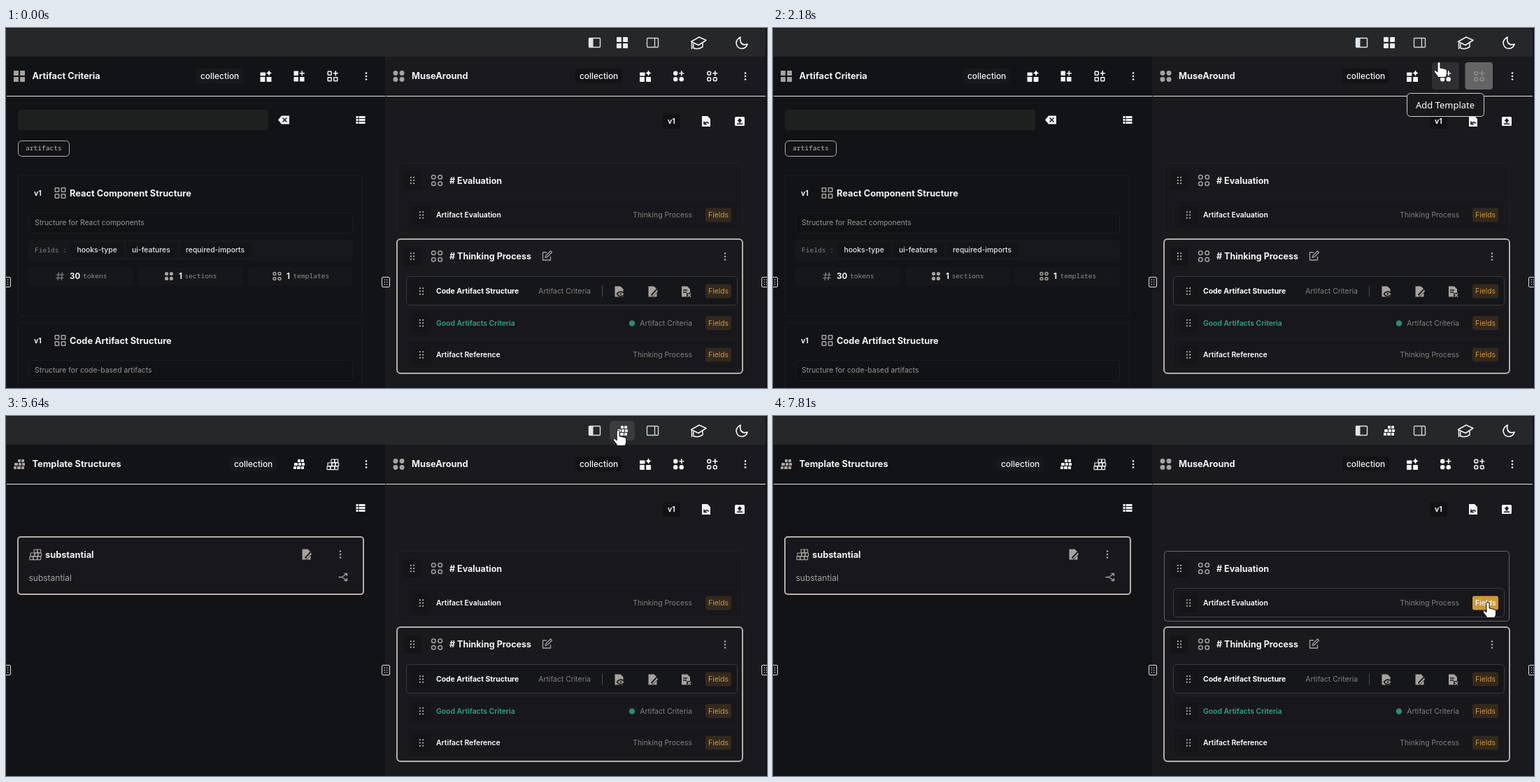
An HTML page that plays this animation: 1088 by 515 pixels, repeating every 8000 ms.

```html
<!DOCTYPE html>
<html lang="en">
<head>
<meta charset="utf-8">
<title>Template panels</title>
<style>
html, body { margin: 0; width: 100%; height: 100%; overflow: hidden; background: #111316; }
svg { display: block; }
text { font-family: Inter, sans-serif; white-space: pre; }
.mono { font-family: "Noto Sans Mono", monospace; }
.tip { font-family: "Noto Sans", sans-serif; }
</style>
</head>
<body>
<svg id="stage" width="1088" height="515" viewBox="0 0 1088 515"></svg>
<script>
const LOOP = 8000, SWITCH = 4150;
const WHITE = '#f4f4f5', STONE = '#a8a29e', GRAY = '#85807c', LEFT = '#111316', RIGHT = '#1a191d';

// Drawing helpers
const rect = (x, y, w, h, fill, r = 0, stroke = 'none', sw = 1) =>
  `<rect x="${x}" y="${y}" width="${w}" height="${h}" rx="${r}" fill="${fill}" stroke="${stroke}" stroke-width="${sw}"/>`;
const circle = (x, y, r, fill, stroke = 'none', sw = 1.5) =>
  `<circle cx="${x}" cy="${y}" r="${r}" fill="${fill}" stroke="${stroke}" stroke-width="${sw}"/>`;
const fillPath = (d, fill) => `<path d="${d}" fill="${fill}"/>`;
const linePath = (d, stroke, sw = 1.5) =>
  `<path d="${d}" fill="none" stroke="${stroke}" stroke-width="${sw}" stroke-linejoin="round"/>`;
const at = (x, y, body) => `<g transform="translate(${x} ${y})">${body}</g>`;
// y is the middle of the capital letters
const text = (x, y, s, size, fill, weight = 400, more = '') =>
  `<text x="${x}" y="${y + size * 0.36}" font-size="${size}" fill="${fill}" font-weight="${weight}" ${more}>${s}</text>`;
const title = (x, y, s, size = 12.8) => text(x, y, s, size, WHITE, 700);
const small = (x, y, s, fill, weight = 400, more = '') => text(x, y, s, 10.4, fill, weight, more);
const mono = (x, y, s, fill) => text(x, y, s, 9.6, fill, 500, 'class="mono"');

// Areas that light up under the pointer
const zones = [];
function hover(x, y, w, h, body, hand = false) {
  zones.push({ x, y, w, h, hand });
  return `<g id="zone${zones.length - 1}" opacity="0">${body}</g>`;
}

// Icons
const STAR = 'M0-4.5Q.8-.8 4.5 0Q.8.8 0 4.5Q-.8.8-4.5 0Q-.8-.8 0-4.5Z';
function grid(x, y, { round, line, extra, c = WHITE, s = 16 } = {}) {
  const a = s * 0.43, o = s / 2 - a / 2, w = 1.5, size = line ? a - w : a;
  const cell = (i, j) => {
    const cx = i * o, cy = j * o, paint = line ? ['none', c] : [c];
    return round ? circle(cx, cy, size / 2, ...paint)
      : rect(cx - size / 2, cy - size / 2, size, size, paint[0], 0.4, paint[1], w);
  };
  let body = cell(-1, 1) + cell(1, 1);
  if (extra === 'star') body += rect(-8, -5.5, 7.5, 5, c, 1) + at(4.5, -4.5, fillPath(STAR, c));
  else {
    body += cell(-1, -1);
    body += extra === 'plus' ? linePath(`M${o} ${-o - 3.5}v7M${o - 3.5} ${-o}h7`, c, 1.7) : cell(1, -1);
  }
  return at(x, y, body);
}
function bricks(x, y, c, line) {
  const rows = [[-2, -7, 4], [3, -7, 4], [-7, -2, 5], [-1, -2, 4], [4, -2, 4], [-8, 3, 4], [-3, 3, 5], [3, 3, 4]];
  return at(x, y, rows.map(([i, j, w]) => line
    ? rect(i, j, w + 0.6, 4.6, 'none', 0.5, c, 1.2)
    : rect(i, j, w, 4, c, 0.4)).join(''));
}
const more = (x, y, c = WHITE) => [-4.5, 0, 4.5].map(d => circle(x, y + d, 1.35, c)).join('');
const dots = (x, y, c, gap = 4, r = 1) =>
  [-1, 0, 1].map(j => circle(x - gap / 2, y + j * gap, r, c) + circle(x + gap / 2, y + j * gap, r, c)).join('');
const handle = (x, y) => rect(x - 13, y - 13, 26, 26, '#151518', 4) + dots(x, y, '#d4d0cc', 4.2, 1);
const list = (x, y) => [-4, 0, 4].map(d =>
  rect(x - 6.5, y + d - 1.5, 3, 3, WHITE) + rect(x - 2.5, y + d - 1.5, 9, 3, WHITE)).join('');
const page = (x, y, c, mark) => at(x, y, fillPath('M-6-7.5H2L6-3.5V7.5H-6Z', c) + mark);
const eye = linePath('M-2 3.5Q2.5-1.5 7 3.5Q2.5 8.5-2 3.5Z', RIGHT, 3.5) +
  fillPath('M-2 3.5Q2.5-1.5 7 3.5Q2.5 8.5-2 3.5Z', STONE) + circle(2.5, 3.5, 1.3, RIGHT);
const pen = linePath('M-1 6L7-2.5', RIGHT, 4.5) + linePath('M0 6L7-1.5', STONE, 2);
const cross = linePath('M-4-2h6M-4 1h5', RIGHT, 1.3) + rect(1, 2, 7, 7, RIGHT) + linePath('M2.5 3l4.5 4.5M7 3L2.5 7.5', STONE, 1.6);
const arrowMark = linePath('M-3 4Q0-1 4 3M-3 0V4H1', RIGHT, 1.5);
const resizer = x => rect(x - 5.5, 356.5, 11, 14, '#151518', 1.5, '#e4e4e4') + dots(x, 363.5, '#e4e4e4', 3.2, 0.75);
const pill = (x, body) => rect(x, 58, 67, 21, body, 5) + text(x + 6, 68.5, 'collection', 11.9, WHITE, 500);

function topBar() {
  return rect(0, 0, 1088, 41, '#262729') + rect(0, 0, 1088, 1, '#17181a') +
    rect(833.5, 14.5, 16, 13, 'none', 1, '#dde5ec', 1.4) + rect(833.5, 14.5, 6, 13, '#dde5ec') +
    rect(916.5, 14.5, 16, 13, 'none', 1, '#cbd5dd', 1.4) + linePath('M927.5 14.5v13', '#cbd5dd', 1.4) +
    linePath('M979.5 19.5L991 13L1001 17.5L990 24.5ZM983 22.5L982.5 28.5Q989 31.5 996 27V21M980.5 20V30', WHITE, 1.5) +
    linePath('M1050 13Q1044 16.5 1044 21.5Q1045 29 1052 29.5Q1058.5 29 1060 23Q1053 25.5 1050.5 20.5Q1049 17 1050 13Z', WHITE, 1.7) +
    hover(863, 7, 36, 28, rect(863, 7, 36, 28, '#3b3c40', 5), true) +
    `<g class="before">${grid(881, 21, { c: '#eee' })}</g><g class="after">${bricks(881, 21, '#eee')}</g>`;
}

function artifactCard(y, name, desc) {
  return rect(17.5, y + 0.5, 492, 202, '#121316', 4, '#1b1c20') +
    small(40, y + 26, 'v1', WHITE, 700) + grid(77.5, y + 26, { line: true, c: STONE }) +
    title(91, y + 26, name) + rect(32.5, y + 54.5, 463, 29, '#111215', 4, '#1c1d21') +
    small(41, y + 68.5, desc, '#9a9692');
}

function criteriaPanel() {
  const chips = [[92, 77, 'hooks-type', 101.5], [171, 74, 'ui-features', 180], [248, 103, 'required-imports', 257]];
  const stats = [[32, 91, '30', 110, 'tokens'], [189, 247, '1', 255.5, 'sections'], [346, 401, '1', 410.5, 'templates']];
  return grid(19, 69, { c: STONE }) + title(37.5, 68.5, 'Artifact Criteria') + pill(272, '#17181b') +
    grid(371.5, 69, { extra: 'star' }) + grid(419, 69, { extra: 'plus', s: 15 }) + grid(467, 69, { extra: 'plus', line: true, s: 15 }) +
    rect(17, 117, 358, 29, '#1e201f', 3) +
    fillPath('M389 131.5L394 125.5H405V137.5H394Z', WHITE) + linePath('M395.5 128.5l6 6M401.5 128.5l-6 6', LEFT, 1.5) +
    rect(17.5, 161.5, 73, 22, 'none', 5, '#b9b1a8') + mono(28, 172, 'artifacts', '#c4bcb3') +
    artifactCard(210, 'React Component Structure', 'Structure for React components') +
    rect(32, 303, 464, 30, '#17181b', 4) + mono(41, 317.5, 'Fields :', GRAY) +
    chips.map(([x, w, s, tx]) => rect(x, 307, w, 21, '#131417', 4) + small(tx, 317.5, s, '#e6e4e2', 500)).join('') +
    stats.map(([x, nx, n, lx, s]) => rect(x, 342, 149.5, 27, '#16171a', 4) +
      text(nx, 355, n, 11.5, WHITE, 700) + mono(lx, 355, s, '#918c88')).join('') +
    linePath('M75.5 349.5L74 361M80.5 349.5L79 361M71.5 353H83M71 357.5H82.5', '#8d8986', 1.2) +
    grid(233, 355, { round: true, c: STONE, s: 12 }) + grid(387.5, 355, { round: true, line: true, c: STONE, s: 12.5 }) +
    artifactCard(421, 'Code Artifact Structure', 'Structure for code-based artifacts');
}

function structuresPanel() {
  return bricks(19, 69, STONE) + title(37.5, 68.5, 'Template Structures') + pill(320, '#17181b') +
    bricks(419, 69, WHITE) + bricks(467, 69, WHITE, true) +
    rect(17, 173, 494, 82, '#17171c', 4, '#b5afa8', 2) +
    bricks(42, 198, STONE, true) + title(56, 198, 'substantial') +
    page(429.5, 198, STONE, pen) + more(478, 198, STONE) +
    text(32.5, 231.5, 'substantial', 12, '#a5a09c') +
    linePath('M475.5 230.5H480L487 226M480 230.5L487 235M483.5 225.5H487.5V229M483.5 235.5H487.5V232', STONE, 1.3);
}

const fields = (y, on) => rect(1000, y - 10, 37, 20, on ? '#cf9934' : '#33291c', 3) +
  small(1004, y, 'Fields', on ? '#fff' : '#d0953a', on ? 500 : 400);

function row(y, name, kind, { green, active } = {}) {
  const top = Math.floor(y) - 20.5;
  const box = (fill, stroke) => rect(572.5, top, 473, 41, fill, 5, stroke);
  const label = small(active ? 836 : 981, y, kind, GRAY, 400, 'text-anchor="end"');
  const tools = linePath('M852.5 368.5v16', '#4a4848', 1) + page(876.5, y + 0.5, STONE, eye) +
    page(924.5, y + 0.5, STONE, pen) + page(972, y + 0.5, STONE, cross);
  return box(active ? '#151619' : '#18171b', active ? '#3b3b3f' : '#1d1c21') +
    (active ? tools : hover(572, top, 474, 41, box('none', '#3b3b3f'))) + handle(594, y) +
    small(615, y, name, green ? '#2fa583' : '#fff', active ? 700 : 600) + label +
    (green ? circle(895, y + 0.5, 4.2, '#258f70') : '') +
    fields(y) + hover(1000, y - 10, 37, 20, fields(y, true), true);
}

function rightPanel() {
  const head = (y, s) => handle(581, y) + grid(616, y, { round: true, line: true, c: STONE, s: 16.5 }) + title(634, y, s, 12.5);
  const adder = c => grid(1009.5, 69, { round: true, line: true, extra: 'plus', s: 15, c });
  return grid(561.5, 69, { round: true, c: STONE }) + title(580, 68.5, 'MuseAround') + pill(814, '#131316') +
    grid(914, 69, { extra: 'star' }) +
    hover(942, 48, 39, 40, rect(942, 49, 39, 39, '#35363a', 4), true) + grid(961.5, 69, { round: true, extra: 'plus', s: 15 }) +
    `<g id="plain">${adder(WHITE)}</g>` +
    `<g id="flash">${rect(989.5, 49, 39.5, 39, '#656465', 4)}${adder('#8c8b8c')}</g>` +
    more(1057, 69) +
    rect(939, 123, 25, 21, '#111214', 4) + small(946, 133.5, 'v1', WHITE, 700) +
    page(1001, 133.5, WHITE, arrowMark) + rect(1042, 127, 14, 13, WHITE, 1.5) +
    fillPath('M1049 129l3.5 4h-2v2.5h-3V133h-2z', RIGHT) + rect(1045, 136.5, 8, 1.5, RIGHT) +
    rect(559.5, 193.5, 493, 100, '#19181c', 4, '#212024') +
    hover(559, 193, 494, 101, rect(559.5, 193.5, 493, 100, 'none', 4, '#67666a')) +
    head(218, '# Evaluation') + row(267.5, 'Artifact Evaluation', 'Thinking Process') +
    rect(559, 302, 494, 192, '#1a191e', 5, '#b5afa8', 2) + head(326.5, '# Thinking Process') +
    linePath('M773 321H767.5V332H778.5V327M771 328.5l1-3L778.5 319l2 2L774 327.5Z', STONE, 1.3) + more(1028, 327, STONE) +
    row(376.5, 'Code Artifact Structure', 'Artifact Criteria', { active: true }) +
    row(422, 'Good Artifacts Criteria', 'Artifact Criteria', { green: true }) +
    row(467.5, 'Artifact Reference', 'Thinking Process');
}

const ARROW = 'M0 0V15.5L3.6 12.2L6.2 18.3L9 17.1L6.4 11.2H11.2Z';
const HAND = 'M-2 1.5a2 2 0 0 1 4 0V8l7 1.5q2.5.6 2.5 3V16q0 3-2 5.5H-1q-2-3.5-5.5-7.5q-1-2.2 1.2-2.4 1.6.4 3.3 2.4z';
const outlined = (id, d) => `<path id="${id}" d="${d}" fill="#fff" stroke="#111" stroke-width="1"/>`;

const stage = document.getElementById('stage');
stage.innerHTML = rect(0, 0, 543, 515, LEFT) + rect(543, 0, 545, 515, RIGHT) + topBar() +
  `<g class="before">${criteriaPanel()}</g><g class="after">${structuresPanel()}</g>` +
  more(515, 69) + list(507, 131.5) + rightPanel() +
  rect(1, 97, 1085, 1, '#e6e6e6') + rect(542.5, 41, 1, 474, '#202024') +
  rect(0, 41, 1, 474, '#1d1e21') + rect(1086, 0, 2, 515, '#111113') +
  resizer(1) + resizer(543) + resizer(1086) +
  `<g id="tip">${rect(906.5, 93.5, 110, 33, '#19191c', 5, '#cfcfd0')}${text(919, 110, 'Add Template', 13, '#fff', 400, 'class="tip"')}</g>` +
  `<g id="cursor">${outlined('arrow', ARROW)}${outlined('hand', HAND)}</g>`;

// Pointer stops: time, x, y
const PATH = [
  [850, 1039, 508], [1060, 1040, 420], [1270, 1039, 300], [1480, 1037, 204], [1620, 1043, 157],
  [1690, 1045, 138], [1830, 1039, 108], [1970, 1012, 74], [2110, 970, 54], [2180, 952, 49],
  [2460, 904, 37], [2670, 890, 27], [3020, 880, 17], [5500, 880, 17], [5850, 868, 27],
  [6130, 850, 46], [6340, 834, 75], [6410, 829, 93], [6550, 838, 140], [6690, 866, 194],
  [6830, 900, 248], [6970, 930, 293], [7180, 962, 336], [7320, 977, 318], [7530, 1002, 281],
  [7600, 1010, 274], [7810, 1022, 267]
];
const FLASH = [[1900, 0], [1970, 1], [2180, 1], [2320, 0]];

function tween(table, t) {
  const i = table.findIndex(k => k[0] > t);
  if (i < 0) return table[table.length - 1].slice(1);
  if (i === 0) return table[0].slice(1);
  const a = table[i - 1], b = table[i], p = (t - a[0]) / (b[0] - a[0]);
  return a.slice(1).map((v, n) => v + (b[n + 1] - v) * p);
}
// The pointer moves in 70 ms steps
function snap(t) {
  const start = t < 4000 ? 850 : 5570;
  return start + Math.floor((t - start) / 70) * 70;
}
function inside(z, t) {
  if (t < 850) return false;
  const [x, y] = tween(PATH, t);
  return x >= z.x && x <= z.x + z.w && y >= z.y && y <= z.y + z.h;
}
function glow(z, t) {
  let n = 0;
  for (let i = 0; i < 8; i++) n += inside(z, t - i * 18);
  return n / 8;
}

const id = name => document.getElementById(name);
const show = (el, on) => { el.style.display = on ? '' : 'none'; };
const before = [...document.querySelectorAll('.before')], after = [...document.querySelectorAll('.after')];
zones.forEach((z, i) => { z.el = id('zone' + i); });

function draw(now) {
  const t = now % LOOP, s = snap(t);
  const [x, y] = tween(PATH, s), [flash] = tween(FLASH, s);
  before.forEach(el => show(el, t < SWITCH));
  after.forEach(el => show(el, t >= SWITCH));
  zones.forEach(z => z.el.setAttribute('opacity', glow(z, s)));
  id('flash').setAttribute('opacity', flash);
  id('plain').setAttribute('opacity', 1 - flash);
  show(id('tip'), s >= 2110 && s < 2320);
  const hand = zones.some(z => z.hand && inside(z, s)) || (s >= 1970 && s < 2110);
  show(id('cursor'), t >= 850);
  show(id('arrow'), !hand);
  show(id('hand'), hand);
  id('cursor').setAttribute('transform', `translate(${x} ${y})`);
}

const begin = performance.now();
function tick() {
  draw(performance.now() - begin);
  requestAnimationFrame(tick);
}
tick();
</script>
</body>
</html>
```
